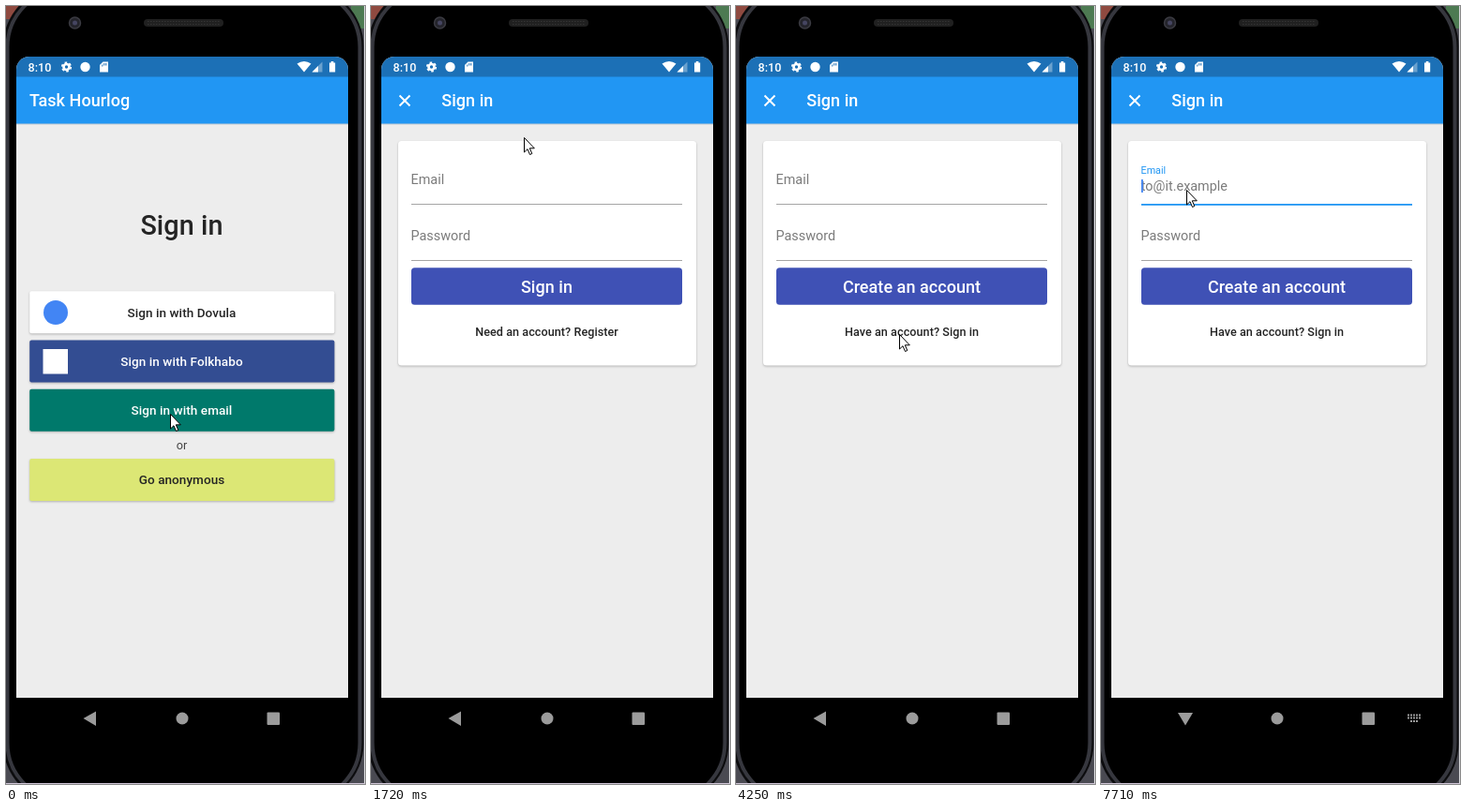
Animation of 383 by 830 pixels, one loop 8 s. Source, as an HTML page:

```html
<!DOCTYPE html>
<html lang="en">
<head>
<meta charset="utf-8">
<title>Sign in flow</title>
<style>
  html, body { margin: 0; width: 100%; height: 100%; overflow: hidden; background: #3a3a42; }
  svg { display: block; width: 100%; height: 100%; }
  text { font-family: Roboto, sans-serif; }
  .title { font-size: 18px; font-weight: 500; letter-spacing: .04px; fill: #fff; }
  .headline { font-size: 28.8px; font-weight: 500; letter-spacing: .08px; fill: #242424; }
  .button { font-size: 13.5px; font-weight: 500; letter-spacing: .07px; }
  .link { font-size: 12.6px; font-weight: 500; letter-spacing: .06px; fill: #242424; }
  .field { font-size: 14.4px; fill: #7b7b7b; }
  .mid { text-anchor: middle; }
  .raised { filter: drop-shadow(0 1px .8px rgba(0, 0, 0, .25)); }
</style>
</head>
<body>
<svg viewBox="0 0 383 830">
  <!-- Phone body -->
  <rect width="383" height="830" fill="#4a4a52"/>
  <rect width="14" height="14" fill="#8f4a40"/>
  <rect x="368" width="14" height="24" fill="#4d7a52"/>
  <rect x="382" width="1" height="830" fill="#d6d6da"/>
  <rect x="-3" y="-21" width="384.5" height="872" rx="64" fill="#0c0c0e"/>
  <rect x="1.5" y="-18" width="376" height="866" rx="62" fill="#000" stroke="#36373e" stroke-width="4"/>
  <rect y="829" width="383" height="1" fill="#cfc4d6"/>
  <circle cx="73.5" cy="18" r="6" fill="#24242b" stroke="#3b3b42" stroke-width="1.5"/>
  <circle cx="73.5" cy="18" r="2.5" fill="#454560"/>
  <rect x="147" y="14" width="85" height="8" rx="4" fill="#202020"/>
  <path d="M151 16.5H229M151 19.5H229" stroke="#343434" stroke-dasharray="1.5 1.5"/>

  <!-- Screen -->
  <path d="M11 738V68a14 14 0 0 1 14-14H351a14 14 0 0 1 14 14V738z" fill="#ededed"/>
  <rect x="11" y="125" width="354" height="1.5" fill="#c4cbd1"/>
  <path d="M11 76V68a14 14 0 0 1 14-14H351a14 14 0 0 1 14 14V76z" fill="#1c70b6"/>
  <rect x="11" y="75.5" width="354" height="50" fill="#2196f3"/>

  <!-- Status bar -->
  <g fill="#fff">
    <text x="23.5" y="69.5" font-size="12.6" font-weight="500">8:10</text>
    <g fill="none" stroke="#fff">
      <circle cx="64.5" cy="65" r="3" stroke-width="2.6"/>
      <circle cx="64.5" cy="65" r="4.8" stroke-width="1.6" stroke-dasharray="2.6 2.427"/>
    </g>
    <circle cx="84.5" cy="65" r="5.2"/>
    <path d="M103.5 59.5H109V70.5H100V63z"/>
    <path d="M102.8 62.5v2M104.8 61v2.5M106.8 61v2.5" stroke="#1c70b6"/>
    <path d="M310.5 61.5Q318 56.5 325.5 61.5L318 70.5z"/>
    <path d="M337.5 59.5V70.5H326.5z" opacity=".35"/>
    <path d="M333 64V70.5H326.5z"/>
    <path d="M345 60.5h1.8v-1.5h2.6v1.5h1.8V70.5H345z"/>
  </g>

  <!-- Start page -->
  <g id="startPage">
    <text class="title" x="25" y="107.4">Task Hourlog</text>
    <text class="headline mid" x="187.5" y="243.5">Sign in</text>
    <g id="choices"></g>
    <rect id="press" x="25.2" y="408.8" width="325.2" height="45" rx="2" fill="#fff" opacity=".1"/>
    <circle cx="53" cy="327" r="13" fill="#4285f4"/>
    <rect x="39.5" y="366" width="26.5" height="26.5" fill="#fff"/>
    <text class="mid" x="187.5" y="472.5" font-size="12.6" fill="#444">or</text>
  </g>

  <!-- Form page -->
  <g id="formPage">
    <path d="M30.5 95.5l11 11m0-11l-11 11" stroke="#fff" stroke-width="2"/>
    <text class="title" x="75.3" y="107.4">Sign in</text>
    <rect class="raised" x="29" y="144" width="318" height="239.5" rx="3.5" fill="#fff"/>
    <clipPath id="linkArea"><rect x="92" y="333" width="190" height="30"/></clipPath>
    <circle id="splash" cx="177" cy="350" r="85" opacity=".025" clip-path="url(#linkArea)"/>
    <text class="field" id="emailLabel" x="42.5">Email</text>
    <text class="field" id="hint" x="42.8" y="197">to@it.example</text>
    <rect id="emailLine" x="43" y="211" width="289"/>
    <rect id="caret" x="43" y="185" width="1.8" height="14" fill="#4285f4"/>
    <text class="field" x="42.5" y="250.4">Password</text>
    <rect x="43" y="271" width="289" height="1" fill="#a5a5a5"/>
    <rect x="43" y="279.2" width="289" height="39.6" rx="3.6" fill="#3f51b5"/>
    <text class="title mid" id="submit" x="187.5" y="306.2"></text>
    <text class="link mid" id="toggle" x="187.5" y="352.3"></text>
  </g>

  <!-- Navigation bar -->
  <g fill="#9b9b9b">
    <path id="back"/>
    <circle cx="188" cy="760" r="6.5"/>
    <rect x="278.5" y="753.5" width="13.5" height="13.5" rx="1"/>
    <path id="keyboard" d="M327 756.5h14M327 759.5h14M330 763h8" fill="none"
          stroke="#9b9b9b" stroke-width="2" stroke-dasharray="2 1"/>
  </g>

  <path id="pointer" d="M.5 .5V16L4 12.7L6.5 18.5L8.8 17.5L6.3 11.8H11.3z" fill="#fff" stroke="#000" stroke-width="1"/>
</svg>
<script>
const DURATION = 8000;
const $ = id => document.getElementById(id);

// Pointer positions: [time, x, y], each held until the next.
const pointerSteps = [
  [0, 175, 435], [630, 152, 432], [770, 151, 432], [1050, 162, 427],
  [1200, 174, 335], [1320, 154, 180], [1440, 159, 100],
  [1720, 163, 140], [1840, 168, 200], [1960, 171, 265], [2080, 172, 315],
  [2220, 172, 331], [2340, 172, 345], [2460, 172, 352], [2830, 174, 350],
  [4680, 162, 318], [4800, 144, 270], [4920, 129, 235],
  [5070, 112, 213], [5190, 99, 197], [5350, 97, 197],
  [6610, 93, 196], [6740, 91, 196]
];

const choices = [
  [304.3, '#fff', '#242424', 'Sign in with Dovula'],
  [356.6, '#334d92', '#fff', 'Sign in with Folkhabo'],
  [408.8, '#00796b', '#fff', 'Sign in with email'],
  [483, '#dce775', '#242424', 'Go anonymous']
];
$('choices').innerHTML = choices.map(([y, fill, ink, label]) => `
  <rect class="raised" x="25.2" y="${y}" width="325.2" height="45" rx="2" fill="${fill}"/>
  <text class="button mid" x="187.5" y="${y + 27.4}" fill="${ink}">${label}</text>`).join('');

function show(id, visible) {
  $(id).style.display = visible ? '' : 'none';
}

function setAttributes(id, attributes) {
  for (const name in attributes) $(id).setAttribute(name, attributes[name]);
}

function render(t) {
  const between = (from, to) => t >= from && t < to;
  const registering = t >= 4010;
  const focused = t >= 6470;
  const keyboardOpen = t >= 7710;

  show('startPage', t < 630);
  show('formPage', t >= 630);
  show('press', between(500, 630));
  show('splash', between(4130, 4250));
  show('hint', focused);
  show('caret', between(6310, 7030) || t >= 7430);
  show('keyboard', keyboardOpen);

  $('submit').textContent = registering ? 'Create an account' : 'Sign in';
  $('toggle').textContent = registering ? 'Have an account? Sign in' : 'Need an account? Register';

  setAttributes('emailLabel', { y: focused ? 179.3 : 190 });
  $('emailLabel').style.fontSize = focused ? '10.8px' : '';
  $('emailLabel').style.fill = focused ? '#2196f3' : '';
  setAttributes('emailLine', focused
    ? { height: 1.8, fill: '#2196f3' }
    : { height: 1, fill: '#a5a5a5' });
  setAttributes('back', { d: keyboardOpen ? 'M82 754H98L90 767.5z' : 'M82.5 760L96 752.5V768z' });

  const [, x, y] = pointerSteps.findLast(step => step[0] <= t);
  setAttributes('pointer', { transform: `translate(${x} ${y})` });
}

const start = performance.now();
function tick() {
  render((performance.now() - start) % DURATION);
  requestAnimationFrame(tick);
}
tick();
</script>
</body>
</html>
```
